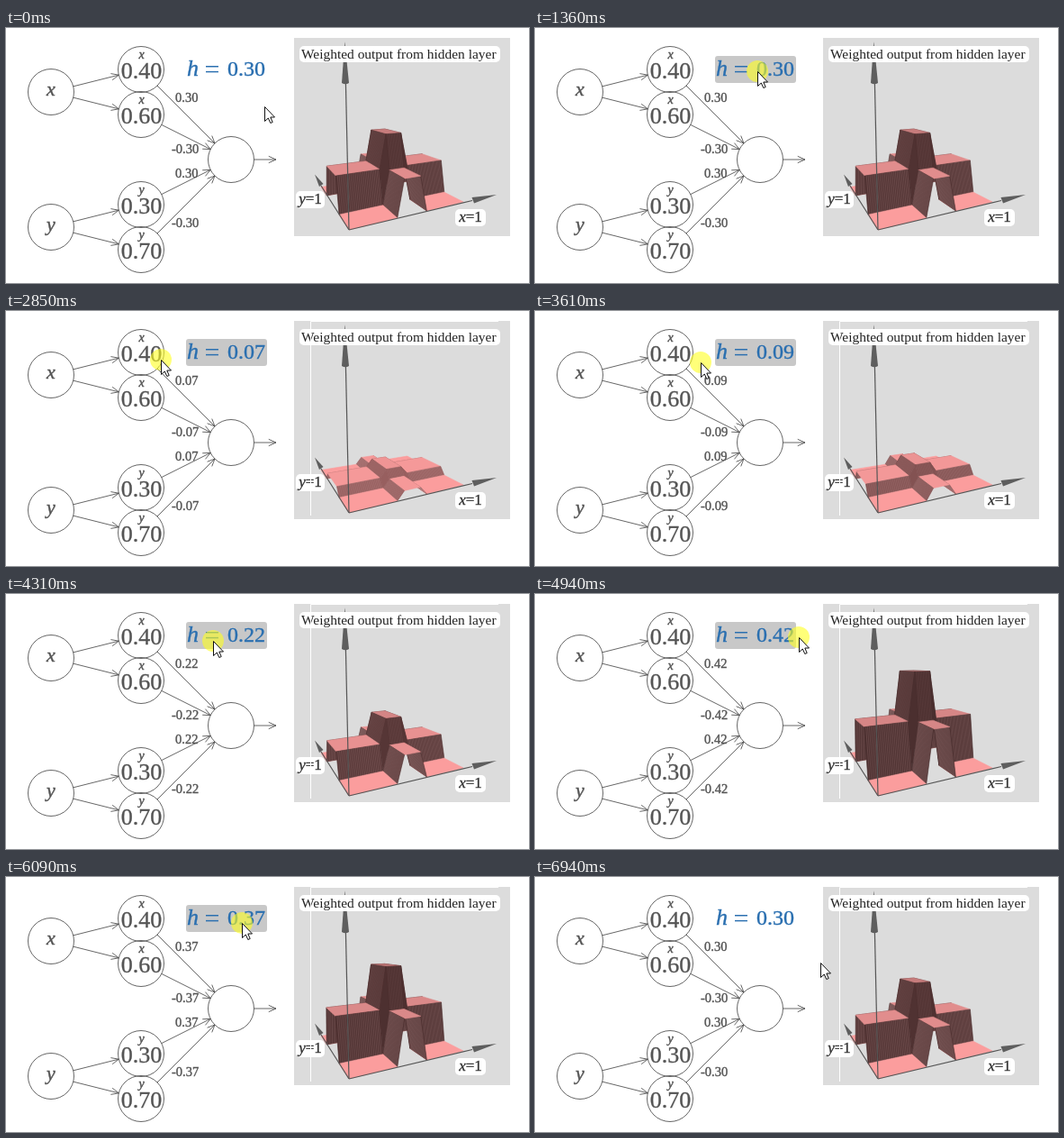
Write an HTML page that moves like this. It is 581 by 283 pixels and loops after 7400 ms.

```html
<!DOCTYPE html>
<html lang="en">
<head>
<meta charset="utf-8">
<title>Weighted output</title>
<style>
html, body { margin: 0; width: 100%; height: 100%; overflow: hidden; background: #fff; }
svg { display: block; width: 581px; height: 283px; }
text { fill: #555; font-family: "Liberation Serif", "Noto Serif", serif; }
.var { font-style: italic; stroke: #555; stroke-width: .45; }
.num { font-size: 26px; stroke: #555; stroke-width: .35; }
.weight { font-size: 14.5px; stroke: #555; stroke-width: .4; }
.net { fill: none; stroke: #555; stroke-width: .9; }
.mid { text-anchor: middle; }
.blue text { fill: #2a6fb0; stroke: #2a6fb0; stroke-width: .4; font-size: 24px; }
.axis { stroke: #555; stroke-width: 1.2; }
.cone { fill: #5e5e5e; }
.tag { font-size: 17px; fill: #333; stroke: #333; stroke-width: .35; }
.title { font-size: 15.45px; fill: #222; }
</style>
</head>
<body>
<svg id="stage" viewBox="0 0 581 283"></svg>
<script>
const LOOP = 7400, LAG = 77;
const DRAG_START = 1360, DRAG_END = 6630, LINE_AT = 1530;
const stage = document.getElementById('stage');

function add(parent, tag, attrs = {}, text) {
  const el = document.createElementNS('http://www.w3.org/2000/svg', tag);
  for (const key in attrs) el.setAttribute(key, attrs[key]);
  if (text !== undefined) el.textContent = text;
  parent.appendChild(el);
  return el;
}
const label = (x, y, cls, text, size) =>
  add(stage, 'text', { x, y, class: cls, ...(size && { 'font-size': size }) }, text);
const box = (x, y, width, height, rx, fill) =>
  add(stage, 'rect', { x, y, width, height, rx, fill });

// Network
const R = 25.5;
const inputs = [['x', 71], ['y', 221]];
const hidden = [['x', 46, '0.40'], ['x', 96, '0.60'], ['y', 196, '0.30'], ['y', 246, '0.70']];

function arrow(x1, y1, x2, y2, gap = R) {
  const a = Math.atan2(y2 - y1, x2 - x1), c = Math.cos(a), s = Math.sin(a);
  const ex = x2 - gap * c, ey = y2 - gap * s;
  const barb = d => `${ex - 9 * Math.cos(a + d)} ${ey - 9 * Math.sin(a + d)}`;
  add(stage, 'path', {
    class: 'net',
    d: `M${x1 + R * c} ${y1 + R * s}L${ex} ${ey}M${barb(.42)}L${ex} ${ey}L${barb(-.42)}`
  });
}
const node = (cx, cy) => add(stage, 'circle', { cx, cy, r: R, class: 'net' });

inputs.forEach(([name, y]) => {
  node(50, y);
  label(50, y + 4, 'var mid', name, 22);
  arrow(50, y, 150, y - 25);
  arrow(50, y, 150, y + 25);
});
hidden.forEach(([name, y, value]) => {
  node(150, y);
  label(150.5, y - 12, 'var mid', name, 14);
  label(150.5, y + 10, 'num mid', value);
  arrow(150, y, 250, 146);
});
node(250, 146);
arrow(250, 146, 300, 146, 0);

const weights = [[188, 82, ''], [184, 139, '-'], [188, 166, ''], [184, 221, '-']]
  .map(([x, y, sign]) => ({ sign, el: label(x, y, 'weight', '') }));

// Adjustable value
const highlight = box(200, 31, 90, 30, 3, '#c8c8c8');
const formula = add(stage, 'g', { class: 'blue' });
add(formula, 'text', { x: 201, y: 53, style: 'font-size:26px;font-style:italic' }, 'h');
add(formula, 'text', { x: 220.5, y: 55.5, style: 'font-size:30px;stroke:none' }, '=');
const valueText = add(formula, 'text', { x: 246, y: 53 });

// Plot
box(320, 11, 240, 220, 0, '#dcdcdc');

function project(x, y, z) {
  const w = 1 + .25 * x + .49 * y - .08 * z;
  return [
    (381 + 254 * x + 140.5 * y - 35.2 * z) / w,
    (224 + 17.25 * x + 39 * y - 167.5 * z) / w
  ];
}
const point = (x, y, z) => project(x, y, z).map(v => v.toFixed(2)).join(' ');

const RAMP = .06;
const xs = [0, .37, .43, .57, .63, 1];
const ys = [0, .27, .33, .67, .73, 1];
const bump = [0, 0, 1, 1, 0, 0];

// Cells in back-to-front order
const cells = [];
for (let j = 4; j >= 0; j--) {
  for (let i = 4; i >= 0; i--) {
    const tower = i > 0 && i < 4 && j > 0 && j < 4;
    cells.push({
      i, j,
      face: add(stage, 'path', { 'stroke-width': .6, 'stroke-linejoin': 'round' }),
      lines: add(stage, 'path', {
        fill: 'none', stroke: '#c8a0a0', 'stroke-width': .7, opacity: tower ? .12 : .3
      })
    });
  }
}

function stripes(i, j, z, alongX) {
  const [a, b] = alongX ? [ys[j], ys[j + 1]] : [xs[i], xs[i + 1]];
  const n = Math.round((b - a) / .013);
  let d = '';
  for (let k = 1; k < n; k++) {
    const u = k / n, p = a + (b - a) * u;
    const mix = (from, to) => from + (to - from) * u;
    d += alongX
      ? `M${point(xs[i], p, mix(z(0, 0), z(0, 1)))}L${point(xs[i + 1], p, mix(z(1, 0), z(1, 1)))}`
      : `M${point(p, ys[j], mix(z(0, 0), z(1, 0)))}L${point(p, ys[j + 1], mix(z(0, 1), z(1, 1)))}`;
  }
  return d;
}

function drawSurface(h) {
  cells.forEach(({ i, j, face, lines }) => {
    const z = (di, dj) => h * (bump[i + di] + bump[j + dj]);
    const corner = (di, dj) => point(xs[i + di], ys[j + dj], z(di, dj));
    const slopeX = bump[i + 1] !== bump[i], slopeY = bump[j + 1] !== bump[j];
    const wall = slopeX || slopeY;
    const up = 1 / Math.sqrt(1 + (h / RAMP) ** 2);
    // Raised tops dim as they are seen more edge-on
    const light = wall ? .28 + .7 * up ** 1.8 : 1 - .35 * Math.max(0, z(0, 0));
    const color = `rgb(${[251, 157, 157].map(v => Math.round(v * light))})`;
    face.setAttribute('d', `M${corner(0, 0)}L${corner(1, 0)}L${corner(1, 1)}L${corner(0, 1)}Z`);
    face.setAttribute('fill', color);
    face.setAttribute('stroke', color);
    lines.setAttribute('d', slopeX !== slopeY ? stripes(i, j, z, slopeX) : '');
  });
}

[[376.5, 20], [350, 175], [518, 191.5]].forEach(([x2, y2]) =>
  add(stage, 'line', { x1: 381, y1: 224, x2, y2, class: 'axis' }));
['M376.3 15L381 61Q377 63.500 373 61Z', 'M343 162.500L352.500 173L348 176Z', 'M545 185L517.500 188L520 194.500Z']
  .forEach(d => add(stage, 'path', { d, class: 'cone' }));

box(326, 20, 223, 18, 5, '#fff');
label(328, 34, 'title', 'Weighted output from hidden layer');

function tag(x, y, width, name) {
  box(x, y, width, 19, 5, '#fff');
  const el = label(x + width / 2, y + 14, 'tag mid', '');
  add(el, 'tspan', { 'font-style': 'italic' }, name);
  add(el, 'tspan', {}, '=1');
}
tag(322, 181, 32, 'y');
tag(499, 201, 34, 'x');
const whiteLine = add(stage, 'path', { d: 'M338.500 227V11.500H547', fill: 'none', stroke: '#fff' });

// Pointer
const halo = add(stage, 'circle', { r: 12, fill: '#ffff20', opacity: .6 });
const pointer = add(stage, 'path', {
  d: 'M.5 .5V16.500L4.300 13L6.800 18.500L9.200 17.500L6.800 12H11.500Z',
  fill: '#fff', stroke: '#111', 'stroke-width': 1
});

// time, x, y
const track = [
  [360, 287, 87], [900, 240, 46], [1090, 240, 46], [1130, 247, 48],
  [1500, 247, 48], [2220, 214, 50], [2370, 201, 51], [3000, 163, 55],
  [3320, 163, 55], [3530, 184, 57], [3740, 184, 57], [4480, 244, 50],
  [4790, 273, 49], [4940, 293, 48], [5250, 315, 46], [5400, 318, 46],
  [5580, 318, 46], [5900, 277, 50], [6090, 262, 51], [6320, 247, 50],
  [6600, 247, 50], [6940, 317, 95]
];

function pointerAt(t) {
  const k = track.findIndex(p => p[0] > t);
  if (k === 0) return track[0].slice(1);
  if (k < 0) return track[track.length - 1].slice(1);
  const [t0, x0, y0] = track[k - 1], [t1, x1, y1] = track[k];
  const u = (t - t0) / (t1 - t0);
  return [x0 + (x1 - x0) * u, y0 + (y1 - y0) * u];
}

// The value trails the pointer: 0.01 for every 3 px
function valueAt(t) {
  if (t < 1500 || t > 6500) return .3;
  return Math.round(30 + (pointerAt(t - LAG)[0] - 247) / 3) / 100;
}

let shown;
function render(t) {
  const [x, y] = pointerAt(t).map(Math.round);
  const dragging = t >= DRAG_START && t < DRAG_END;
  const hover = x >= 200 && x <= 290 && y >= 31 && y <= 61;
  const show = (el, on) => el.setAttribute('visibility', on ? 'visible' : 'hidden');

  pointer.setAttribute('transform', `translate(${x} ${y})`);
  halo.setAttribute('cx', x);
  halo.setAttribute('cy', y);
  show(halo, dragging);
  show(highlight, dragging || hover);
  highlight.setAttribute('fill', dragging ? '#c8c8c8' : '#e0e0e0');
  show(whiteLine, t >= LINE_AT);

  const h = valueAt(t);
  if (h === shown) return;
  shown = h;
  valueText.textContent = h.toFixed(2);
  weights.forEach(({ sign, el }) => { el.textContent = sign + h.toFixed(2); });
  drawSurface(h);
}

const start = performance.now();
function frame() {
  render((performance.now() - start) % LOOP);
  requestAnimationFrame(frame);
}
frame();
</script>
</body>
</html>
```
